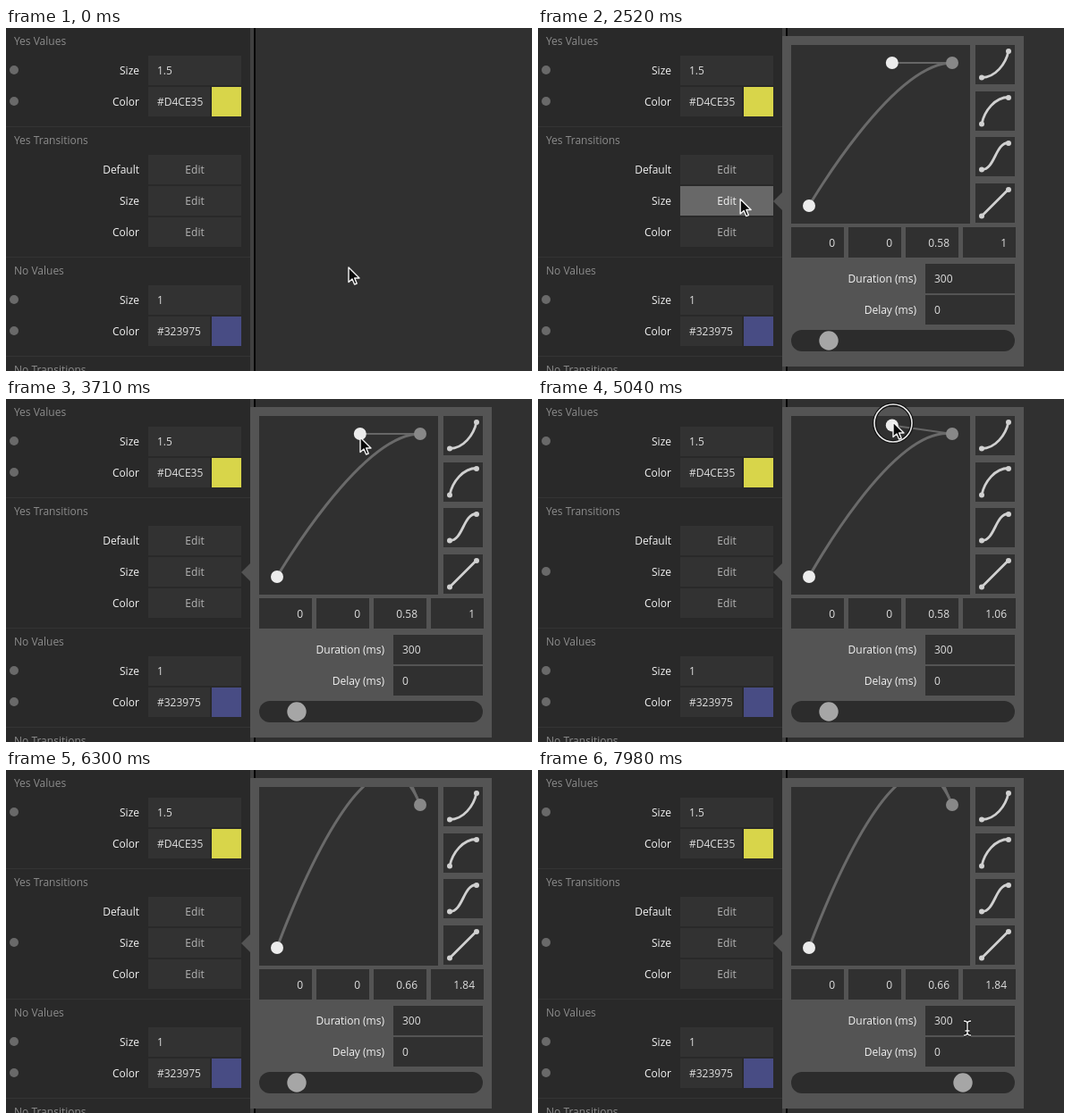
Animation of 588 by 384 pixels, one loop 8 s. Source, as an HTML page with a canvas:

```html
<!DOCTYPE html>
<html lang="en">
<head>
<meta charset="utf-8">
<title>Transition editor</title>
<style>
html, body { margin: 0; width: 100%; height: 100%; overflow: hidden; background: #303030; }
canvas { display: block; }
</style>
</head>
<body>
<canvas id="stage" width="588" height="384"></canvas>
<script>
const ctx = document.getElementById('stage').getContext('2d');
const LOOP = 8000, STEP = 70;
const CLICK = 1120, OPEN = 1330, GRAB = 4200, EDITED = 4270, DROP = 6300, PREVIEW = 6965;
const TAU = Math.PI * 2;

const linear = p => p;
const easeOut = p => 1 - (1 - p) ** 2;
const easeInOut = p => p * p * (3 - 2 * p);

// [time, x, y, easing of the segment that ends here]
const cursorPath = [
  [0, 383, 268],
  [700, 223, 194, easeInOut],
  [2450, 223, 194, linear],
  [3290, 383, 69, easeInOut],
  [3710, 396, 43, easeOut],
  [3990, 397, 40, linear],
  [4830, 397, 40, linear],
  [5040, 397, 26, linear],
  [5670, 409, -97, easeInOut],
  [7070, 409, -60, linear],
  [7770, 468, 316, easeInOut],
  [7980, 480, 289, easeOut]
];

// Second control point of the timing curve
const controlPath = [
  [0, 0.58, 1],
  [EDITED - STEP, 0.58, 1, linear],
  [EDITED, 0.58, 0.99, linear],
  [4830, 0.58, 0.99, linear],
  [5040, 0.58, 1.06, linear],
  [5670, 0.65, 1.78, easeInOut],
  [6020, 0.66, 1.83, easeOut],
  [6160, 0.66, 1.83, linear],
  [DROP, 0.66, 1.84, linear]
];

function follow(path, t) {
  const i = path.findIndex(key => key[0] > t);
  if (i < 0) return path[path.length - 1].slice(1, 3);
  const [t0, x0, y0] = path[i - 1], [t1, x1, y1, ease] = path[i];
  const p = ease((t - t0) / (t1 - t0));
  return [x0 + (x1 - x0) * p, y0 + (y1 - y0) * p];
}

function rect(x, y, w, h, color) {
  ctx.fillStyle = color;
  ctx.fillRect(x, y, w, h);
}

function disc(x, y, r, color) {
  ctx.fillStyle = color;
  ctx.beginPath();
  ctx.arc(x, y, r, 0, TAU);
  ctx.fill();
}

function text(str, x, y, color = '#f0f0f0', align = 'left') {
  ctx.fillStyle = color;
  ctx.textAlign = align;
  ctx.fillText(str, x, y);
}

function stroke(color, width) {
  ctx.strokeStyle = color;
  ctx.lineWidth = width;
  ctx.stroke();
}

const inside = ([x, y], [rx, ry, rw, rh]) => x >= rx && x < rx + rw && y >= ry && y < ry + rh;

function heading(str, baseline) {
  text(str, 9, baseline, '#8c8c8c');
}

function label(str, y) {
  text(str, 149, y + 21, '#f2f2f2', 'right');
}

function field(name, value, y, swatch) {
  label(name, y);
  rect(159, y, swatch ? 69 : 104, 33, '#323232');
  text(value, 169, y + 21, '#dedede');
  if (swatch) rect(230, y, 33, 33, swatch);
}

function editButton(name, y, pointer) {
  const hover = inside(pointer, [159, y, 104, 33]);
  label(name, y);
  rect(159, y, 104, 33, hover ? '#686868' : '#323232');
  text('Edit', 211, y + 21, hover ? '#f4f4f4' : '#b4b4b4', 'center');
}

function drawPanel(t, pointer) {
  rect(0, 0, 588, 384, '#303030');
  rect(0, 0, 273, 384, '#292929');
  rect(273, 0, 4, 384, '#404040');
  rect(277, 0, 2, 384, '#050505');
  for (const y of [110, 256, 367]) rect(0, y, 273, 1, '#343434');

  heading('Yes Values', 19);
  field('Size', '1.5', 31);
  field('Color', '#D4CE35', 66, '#d8d54a');
  heading('Yes Transitions', 130);
  editButton('Default', 142, pointer);
  editButton('Size', 177, pointer);
  editButton('Color', 212, pointer);
  heading('No Values', 276);
  field('Size', '1', 288);
  field('Color', '#323975', 323, '#484c84');
  heading('No Transitions', 387);

  for (const y of [47, t < EDITED ? 82 : 193, 304, 339]) disc(9, y, 5, '#696969');
}

// Traces a unit timing curve in a square whose lower left corner is (x, y)
function traceCurve(x, y, size, [a, b, c, d]) {
  ctx.beginPath();
  ctx.moveTo(x, y);
  ctx.bezierCurveTo(x + a * size, y - b * size, x + c * size, y - d * size, x + size, y - size);
}

function timing(p, cx, cy) {
  if (p <= 0) return 0;
  if (p >= 1) return 1;
  const at = (s, c) => 3 * (1 - s) * s * s * c + s ** 3;
  let lo = 0, hi = 1;
  for (let i = 0; i < 24; i++) {
    const mid = (lo + hi) / 2;
    if (at(mid, cx) < p) lo = mid; else hi = mid;
  }
  return at(lo, cy);
}

const presets = [[0.5, 0, 0.9, 0.5], [0.1, 0.5, 0.5, 1], [0.5, 0, 0.5, 1], [0.33, 0.33, 0.67, 0.67]];

function drawPlot(cx, cy) {
  const hx = 303 + cx * 160, hy = 199 - cy * 160;
  rect(283, 19, 200, 200, '#303030');
  ctx.save();
  ctx.beginPath();
  ctx.rect(283, 19, 200, 200);
  ctx.clip();
  ctx.beginPath();
  ctx.moveTo(hx, hy);
  ctx.lineTo(463, 39);
  stroke('#666666', 2);
  traceCurve(303, 199, 160, [0, 0, cx, cy]);
  stroke('#6a6a6a', 3);
  disc(463, 39, 7, '#888888');
  disc(303, 199, 7, '#ececec');
  disc(hx, hy, 7, '#ececec');
  ctx.restore();
}

function drawPopup(t) {
  const [cx, cy] = follow(controlPath, t);
  rect(273, 9, 270, 370, '#545454');
  ctx.fillStyle = '#545454';
  ctx.beginPath();
  ctx.moveTo(273, 184);
  ctx.lineTo(263, 194);
  ctx.lineTo(273, 204);
  ctx.fill();

  drawPlot(cx, cy);

  presets.forEach((curve, i) => {
    const y = Math.round(19 + i * 51.6);
    rect(489, y, 44, 44, '#303030');
    traceCurve(496, y + 36.5, 30, curve);
    stroke('#d0d0d0', 2.8);
    disc(496, y + 36.5, 3, '#d0d0d0');
    disc(526, y + 6.5 + 0.5, 3, '#d0d0d0');
  });

  [0, 0, cx, cy].forEach((value, i) => {
    const x = 283 + i * 64;
    rect(x, 223, 59, 34, '#303030');
    text(String(+value.toFixed(2)), x + 49, 245, '#dedede', 'right');
  });

  [['Duration (ms)', '300', 264], ['Delay (ms)', '0', 299]].forEach(([name, value, y]) => {
    text(name, 423, y + 21, '#f2f2f2', 'right');
    rect(433, y, 100, 33, '#303030');
    text(value, 443, y + 21, '#dedede');
  });

  ctx.fillStyle = '#2c2c2c';
  ctx.beginPath();
  ctx.roundRect(283, 338, 250, 24, 12);
  ctx.fill();
  disc(325 + 150 * timing((t - PREVIEW) / 300, cx, cy), 350, 10.7, '#a6a6a6');
}

function drawRing(x, y) {
  ctx.beginPath();
  ctx.arc(x, y, 21, 0, TAU);
  stroke('#101010', 4);
  stroke('#e8e8e8', 1.6);
}

function drawArrow(x, y) {
  ctx.beginPath();
  [[0, 0], [0, 16.5], [4, 13], [6.6, 19], [9.2, 18], [6.7, 12], [12, 12]]
    .forEach(([dx, dy]) => ctx.lineTo(x + dx, y + dy));
  ctx.closePath();
  ctx.fillStyle = '#0a0a0a';
  ctx.fill();
  stroke('#f4f4f4', 1.4);
}

function drawBeam(x, y) {
  ctx.beginPath();
  for (const side of [-1, 1]) {
    ctx.moveTo(x - 4, y + side * 8);
    ctx.quadraticCurveTo(x, y + side * 8, x, y + side * 5);
    ctx.quadraticCurveTo(x, y + side * 8, x + 4, y + side * 8);
  }
  ctx.moveTo(x, y - 6);
  ctx.lineTo(x, y + 6);
  ctx.moveTo(x - 2.5, y + 3);
  ctx.lineTo(x + 2.5, y + 3);
  stroke('#101010', 3.4);
  stroke('#f0f0f0', 1.4);
}

function draw(t) {
  const pointer = follow(cursorPath, t);
  const [x, y] = pointer;
  const open = t >= OPEN;
  const dragging = t >= GRAB && t < DROP;
  ctx.font = '12px "Open Sans", "Noto Sans", sans-serif';
  ctx.textBaseline = 'alphabetic';
  ctx.lineJoin = 'round';

  drawPanel(t, pointer);
  if (open) drawPopup(t);
  if ((t >= CLICK && !open) || dragging) drawRing(x, y + 1);

  const overInput = open && (inside(pointer, [433, 264, 100, 68]) || inside(pointer, [283, 223, 250, 34]));
  if (overInput) drawBeam(x, y);
  else drawArrow(x, y);
}

const start = performance.now();
function tick() {
  const t = (performance.now() - start) % LOOP;
  draw(Math.floor(t / STEP) * STEP);
  requestAnimationFrame(tick);
}
tick();
</script>
</body>
</html>
```
